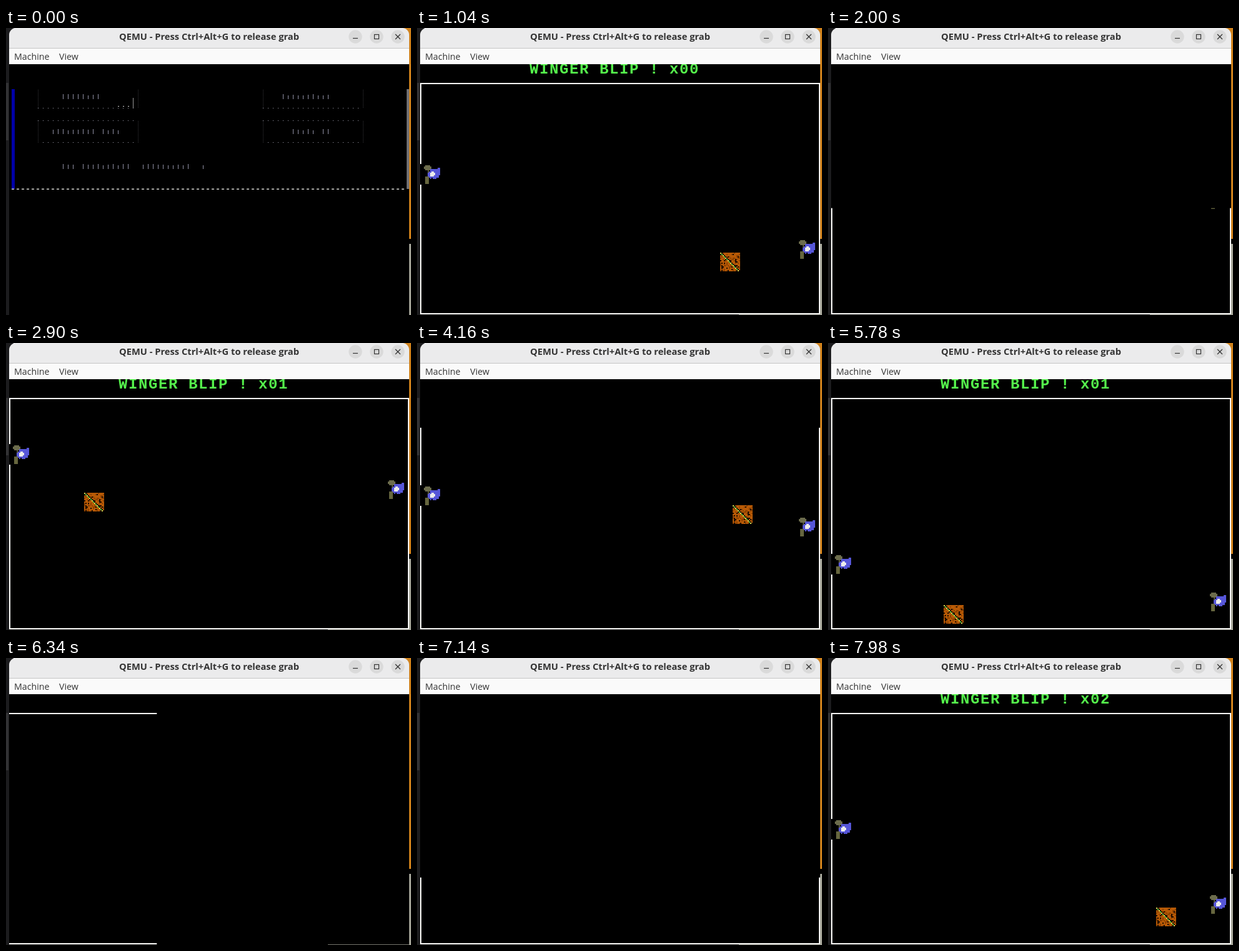
These frames come from a looping animation (648 px wide and 460 px high, 8 s). An HTML page with a canvas:

```html
<!DOCTYPE html>
<html lang="en">
<head>
<meta charset="utf-8">
<style>
  html, body { margin: 0; width: 100%; height: 100%; overflow: hidden; background: #000; }
  canvas { display: block; }
</style>
</head>
<body>
<canvas id="stage" width="648" height="460"></canvas>
<script>
const ctx = document.getElementById('stage').getContext('2d');
const LOOP = 8000, TICK = 20, MENU_END = 60;
// Parts of one redraw cycle: clear, top and bottom lines, side lines, finished picture
const CLEAR_END = 0.293, ROWS_END = 0.423, SIDES_END = 0.5;
const LINE = '#fdfdfa', INK = '#343434';
const FONT = '"Open Sans", sans-serif';

// [time in ms, redraw cycle]: about 67 ms per cycle, slightly uneven
const PACE = [[0, -42.9], [2900, 0.7], [4160, 20.057], [5200, 34.7], [6340, 52.341], [8000, 76.98]];
// [cycle, y] of the left player
const PLAYER = [[-43, 250], [0, 164], [19, 230], [34, 362], [76, 260]];

function rect(color, x, y, w, h) {
  ctx.fillStyle = color;
  ctx.fillRect(x, y, w, h);
}

function disc(color, x, y, r) {
  ctx.fillStyle = color;
  ctx.beginPath();
  ctx.arc(x, y, r, 0, 2 * Math.PI);
  ctx.fill();
}

function line(x1, y1, x2, y2) {
  ctx.beginPath();
  ctx.moveTo(x1, y1);
  ctx.lineTo(x2, y2);
  ctx.stroke();
}

function text(str, x, y, font, color, align = 'left', spacing = '0px') {
  ctx.font = font;
  ctx.fillStyle = color;
  ctx.textAlign = align;
  ctx.letterSpacing = spacing;
  ctx.fillText(str, x, y);
}

function interpolate(keys, at) {
  let i = 1;
  while (i < keys.length - 1 && at > keys[i][0]) i++;
  const [a, va] = keys[i - 1], [b, vb] = keys[i];
  return va + (vb - va) * (at - a) / (b - a);
}

// Triangle wave: 0 up to n and back
function bounce(step, n) {
  const p = ((step % (2 * n)) + 2 * n) % (2 * n);
  return p > n ? 2 * n - p : p;
}

function random(seed) {
  return () => (seed = (seed * 16807) % 2147483647) / 2147483647;
}

function drawDesktop() {
  rect('#1c1c1e', 0, 0, 12, 460);
  rect('#323234', 0, 88, 4, 92);
  rect('#d0821c', 636, 0, 12, 338);
  rect('#000', 645, 338, 3, 8);
  rect('#a4a498', 645, 346, 3, 114);
}

function drawWindow() {
  ctx.fillStyle = '#ebebec';
  ctx.beginPath();
  ctx.roundRect(5, 0, 640, 33, [11, 11, 0, 0]);
  ctx.fill();
  rect('#c6c6c6', 5, 32, 640, 1);
  rect('#fafafa', 5, 33, 640, 25);
  text('QEMU - Press Ctrl+Alt+G to release grab', 325, 19, 'bold 14.7px ' + FONT, INK, 'center');
  text('Machine', 13, 51, '14.2px ' + FONT, INK);
  text('View', 85, 51, '14.2px ' + FONT, INK);
  for (const x of [559, 593, 627]) disc('#dadada', x, 14, 10.7);
  ctx.strokeStyle = INK;
  ctx.lineWidth = 1.2;
  line(555, 16.5, 563, 16.5);
  ctx.strokeRect(589.5, 10.5, 7, 7);
  line(623, 10, 631, 18);
  line(631, 10, 623, 18);
  rect('#000', 5, 58, 640, 402);
}

// The menu as it is torn down: one pixel column in eight is left
function drawMenu() {
  const rnd = random(77);
  const slivers = (str, x, y) => [...str].forEach((char, i) => {
    const cut = Math.floor(rnd() * 3);
    if (char !== ' ') rect('#9090a4', x + i * 8, y + cut, 1, 8 - cut);
  });
  for (const x of [51, 411]) {
    for (let dx = 0; dx < 160; dx += 8) {
      for (const y of [128, 148, 183]) rect('#a0a0b0', x + dx, y, 1, 1);
    }
    for (let y = 99; y < 184; y += 2) {
      if (y < 129 || y > 148) for (const dx of [0, 160]) rect('#343438', x + dx, y, 1, 1);
    }
  }
  slivers('Solo.run', 91, 106);
  slivers('Duel.balls', 443, 106);
  slivers('Practices Mode', 75, 162);
  slivers('Sound On', 459, 162);
  slivers('The difficulty  adjustment  :', 91, 218);
  for (let x = 179; x < 203; x += 8) rect('#ddd', x, 125, 2, 1);
  rect('#999', 203, 112, 1, 16);
  rect('#0000a8', 9, 98, 5, 160);
  rect('#707074', 641, 98, 4, 160);
  for (let x = 9; x < 641; x += 8) rect('#d4d4d0', x, 257.5, 4, 1.5);
}

// An ellipse of 2 px cells with frayed edges
function blob(color, cx, cy, rx, ry, rnd) {
  for (let y = -ry; y < ry; y += 2) {
    for (let x = -rx; x < rx; x += 2) {
      const reach = ((x + 1) / rx) ** 2 + ((y + 1) / ry) ** 2;
      if (reach < 0.8 + rnd() * 0.4) rect(color, cx + x, cy + y, 2, 2);
    }
  }
}

function drawFigure(x, y) {
  const rnd = random(31);
  blob('#6c6c4c', x + 6, y + 4, 6, 4, rnd);
  rect('#55553a', x + 6, y + 8, 2, 10);
  rect('#66663e', x + 2, y + 18, 6, 12);
  blob('#5656d8', x + 16, y + 14, 10, 8, rnd);
  rect('#5656d8', x + 22, y + 4, 4, 6);
  blob('#ececec', x + 14, y + 14, 4, 4, rnd);
}

function drawBall(x, y) {
  const rnd = random(4242);
  for (let row = 0; row < 15; row++) {
    for (let col = 0; col < 16; col++) {
      const shade = rnd();
      const color = row === col ? (col % 2 ? '#46c83c' : '#d8d854')
        : row === col - 1 || shade < 0.14 ? '#1c0c00'
        : shade < 0.4 ? '#8e4200' : '#b85a06';
      rect(color, x + col * 2, y + row * 2, 2, 2);
    }
  }
}

function drawRows(width) {
  rect(LINE, 5, 88, width, 2);
  rect(LINE, 5, 457, width, 2);
}

function drawSides(height) {
  rect(LINE, 5, 88, 2, height);
  rect(LINE, 643, 88, 2, height);
}

const ballY = step => 100 + 20 * bounce(step + 7, 17);

function drawGame(step) {
  drawRows(640);
  drawSides(371);
  const score = Math.floor((step + 5) / 56) + 1;
  text('WINGER BLIP ! x' + String(score).padStart(2, '0'), 180, 73,
       'bold 24px "Liberation Mono", monospace', '#55f24c', 'left', '1.6px');
  const playerY = 2 * Math.round(interpolate(PLAYER, step) / 2);
  rect('#000', 5, playerY - 2, 2, 33);
  drawFigure(11, playerY);
  drawFigure(611, ballY(step - 1)); // the opponent trails the ball by one step
  drawBall(25 + 20 * bounce(step + 5, 28), ballY(step));
}

function drawScreen(t) {
  if (t < MENU_END) return drawMenu();
  const cycle = interpolate(PACE, t);
  const step = Math.floor(cycle), phase = cycle - step;
  rect('#77776e', 515, 459, 130, 1);
  if (phase < CLEAR_END) {
    drawGame(step - 1);
    rect('#000', 5, 58, 640, 400 * phase / CLEAR_END);
  } else if (phase < ROWS_END) {
    drawRows(640 * (phase - CLEAR_END) / (ROWS_END - CLEAR_END));
  } else if (phase < SIDES_END) {
    drawRows(640);
    drawSides(371 * (phase - ROWS_END) / (SIDES_END - ROWS_END));
  } else {
    drawGame(step);
  }
}

const start = performance.now();

function frame() {
  const elapsed = Math.max(0, performance.now() - start) % LOOP;
  drawDesktop();
  drawWindow();
  ctx.save();
  ctx.beginPath();
  ctx.rect(5, 58, 640, 402);
  ctx.clip();
  drawScreen(Math.floor(elapsed / TICK) * TICK);
  ctx.restore();
  requestAnimationFrame(frame);
}
frame();
</script>
</body>
</html>
```
